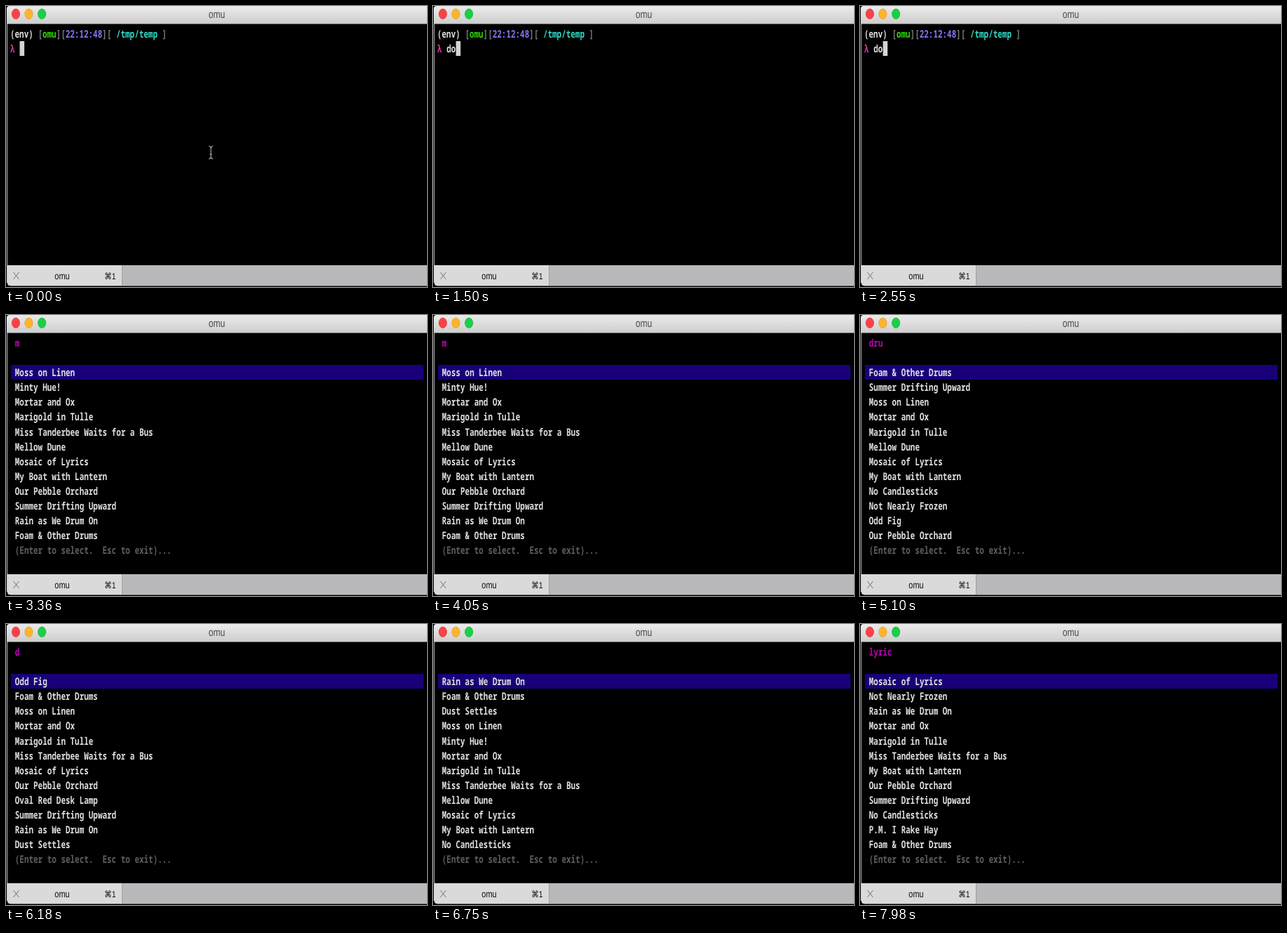
Animation of 600x400 px, one loop 8000 ms. Source, as an HTML page:

```html
<!DOCTYPE html>
<html lang="en">
<head>
<meta charset="utf-8">
<title>Fuzzy finder in a terminal</title>
<style>
  html, body { margin: 0; width: 100%; height: 100%; overflow: hidden; background: #000; }
  svg { display: block; width: 100%; height: 100%; }
  text { white-space: pre; text-rendering: geometricPrecision; }
  .mono { font: 600 10.95px "Noto Sans Mono", "DejaVu Sans Mono", monospace; fill: #dedede; }
  .ui { font: 12px "Liberation Sans", Arial, sans-serif; }
  .tab { font-size: 11px; fill: #101010; }
  .bracket { fill: #7c7c7c; }
  .user { fill: #2ed60a; }
  .clock { fill: #8474f2; }
  .path { fill: #30d8c4; }
  .lambda { fill: #f030a4; font-weight: 700; }
  .query { fill: #bc00b4; }
  .hint { fill: #5e5e5e; }
</style>
</head>
<body>
<svg viewBox="0 0 600 400" preserveAspectRatio="none">
  <defs>
    <linearGradient id="bar" x2="0" y2="1">
      <stop offset="0" stop-color="#ebebeb"/>
      <stop offset="1" stop-color="#cecece"/>
    </linearGradient>
  </defs>

  <rect width="600" height="400" fill="#000"/>
  <path d="M1.5 20V394" stroke="#c8c8c8"/>
  <path d="M1 25V4Q1 0 5 0H600V25Z" fill="url(#bar)"/>
  <path d="M2 25.5H600" stroke="#707070"/>
  <g stroke-width=".7">
    <ellipse cx="14" cy="11.3" rx="5.6" ry="7.2" fill="#fb4248" stroke="#d8363c"/>
    <ellipse cx="32.5" cy="11.3" rx="5.6" ry="7.2" fill="#fdb42c" stroke="#d89c24"/>
    <ellipse cx="51.2" cy="11.3" rx="5.6" ry="7.2" fill="#18d048" stroke="#18ac3c"/>
  </g>
  <text class="ui" transform="translate(300.5 17) scale(1 1.28)" text-anchor="middle" fill="#484848">omu</text>

  <rect x="165" y="369" width="435" height="29" fill="#b9b9bb"/>
  <path d="M2 369H165V398H5Q2 398 2 394Z" fill="#dadada"/>
  <path d="M165.5 369V398" stroke="#a0a0a0"/>
  <path d="M10.5 379L18.5 389M18.5 379L10.5 389" stroke="#707070"/>
  <path d="M6 398.5H600" stroke="#646464"/>
  <g class="ui">
    <text class="tab" transform="translate(80 389) scale(1 1.25)" text-anchor="middle">omu</text>
    <text class="tab" transform="translate(156.5 389) scale(1 1.2)" text-anchor="end"
      style="font-family:'Liberation Sans','DejaVu Sans',sans-serif;font-size:10.5px">⌘1</text>
  </g>

  <g id="shell">
    <text class="mono" transform="translate(6 45) scale(1 1.35)">(env) <tspan class="bracket">[</tspan><tspan class="user">omu</tspan><tspan class="bracket">][</tspan><tspan class="clock">22:12:48</tspan><tspan class="bracket">][</tspan><tspan class="path"> /tmp/temp </tspan><tspan class="bracket">]</tspan></text>
    <text class="mono" transform="translate(6 66.1) scale(1 1.35)"><tspan class="lambda">λ</tspan> <tspan id="command"></tspan></text>
    <rect id="cursor" y="50" width="6.6" height="21" fill="#d4d4d4"/>
    <path id="pointer" d="M289 199.5Q292 199.5 292 202V215Q292 217.8 289 217.8M295 199.5Q292 199.5 292 202M292 215Q292 217.8 295 217.8M290.5 211H293.5" fill="none" stroke="#c8c8c8"/>
  </g>

  <g id="finder">
    <rect x="7" y="71" width="588" height="21" fill="#190078"/>
  </g>
</svg>

<script>
const LOOP = 8000, CHAR = 6.57, ROW = 21.09;
const FINDER_OPENS = 2730;

const titles = {
  a: "Moss on Linen", b: "Minty Hue!", c: "Mortar and Ox",
  d: "Marigold in Tulle", e: "Miss Tanderbee Waits for a Bus",
  f: "Mellow Dune", g: "Mosaic of Lyrics", h: "My Boat with Lantern",
  i: "Our Pebble Orchard", j: "Summer Drifting Upward",
  k: "Rain as We Drum On", l: "Foam & Other Drums",
  m: "No Candlesticks", n: "Not Nearly Frozen", o: "Odd Fig",
  p: "Oval Red Desk Lamp", q: "Dust Settles", r: "P.M. I Rake Hay"
};

// Result order by query prefix; the longest matching prefix wins.
const rankings = [
  ["dr", "ljacdfghmnoi"],
  ["d", "olacdegipjkq"],
  ["l", "gnkcdehijmrl"],
  ["m", "abcdefghijkl"],
  ["", "klqabcdefghm"]
];

const commandSteps = [[0, ""], [510, "d"], [780, "do"]];
const querySteps = [
  [0, ""], [3300, "m"],
  [4770, ""], [4920, "d"], [5010, "dr"], [5100, "dru"], [5220, "drug"], [5340, "drugs"],
  [5880, "drug"], [5970, "dru"], [6060, "dr"], [6150, "d"], [6270, ""],
  [6900, "l"], [7110, "ly"], [7320, "lyr"], [7530, "lyri"], [7740, "lyric"]
];

const $ = id => document.getElementById(id);
const stepAt = (steps, t) => steps.findLast(([start]) => start <= t)[1];
const show = (el, on) => { el.style.display = on ? "" : "none"; };

function addLine(row, kind = "", content = "") {
  const line = document.createElementNS("http://www.w3.org/2000/svg", "text");
  line.setAttribute("class", `mono ${kind}`);
  line.setAttribute("transform", `translate(12.8 ${45 + row * ROW}) scale(1 1.35)`);
  line.textContent = content;
  $("finder").append(line);
  return line;
}

const queryLine = addLine(0, "query");
const resultLines = Array.from({ length: 12 }, (_, i) => addLine(i + 2));
addLine(14, "hint", "(Enter to select.  Esc to exit)...");

function setText(el, value) {
  if (el.textContent !== value) el.textContent = value;
}

function draw(t) {
  const open = t >= FINDER_OPENS;
  show($("shell"), !open);
  show($("finder"), open);

  if (!open) {
    const command = stepAt(commandSteps, t);
    setText($("command"), command);
    $("cursor").setAttribute("x", 6.4 + (2 + command.length) * CHAR);
    show($("pointer"), !command);
    return;
  }

  const query = stepAt(querySteps, t);
  const order = rankings.find(([prefix]) => query.startsWith(prefix))[1];
  setText(queryLine, query);
  resultLines.forEach((line, i) => setText(line, titles[order[i]]));
}

const start = performance.now();
function tick() {
  draw((performance.now() - start) % LOOP);
  requestAnimationFrame(tick);
}
tick();
</script>
</body>
</html>
```
